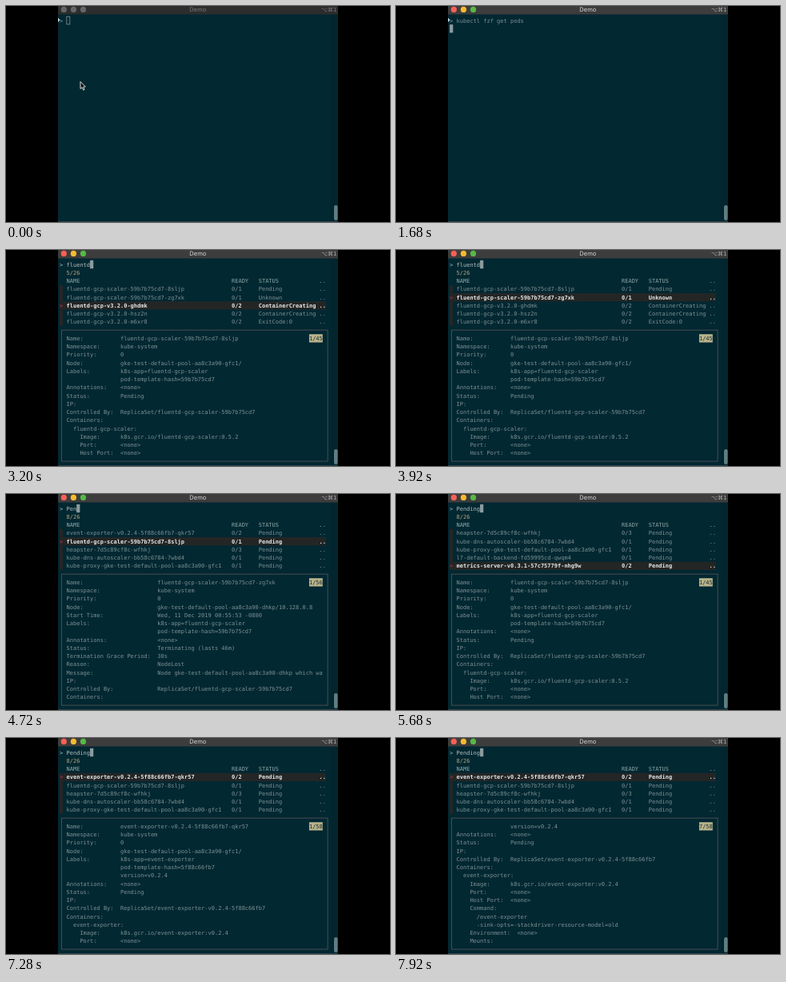
An HTML page with a canvas that plays this animation: 480x270 px, repeating every 8 s.

```html
<!DOCTYPE html>
<html lang="en">
<head>
<meta charset="utf-8">
<title>Demo</title>
<style>
  html, body { margin: 0; width: 100%; height: 100%; overflow: hidden; background: #000; }
  canvas { display: block; width: 480px; height: 270px; }
</style>
</head>
<body>
<canvas id="stage"></canvas>
<script>
const LOOP = 8000, TICK = 80;
const CW = 4.214, RH = 10.26, LEFT = 67.1, TOP = 12.9;
const C = {
  bg: '#022832', text: '#7f9193', bright: '#b4bfbf', head: '#8fa8a8', info: '#b3a57c',
  row: '#242626', selected: '#e6e6e6', pointer: '#c8304f', border: '#5d5558', badge: '#b8b48c'
};

const canvas = document.getElementById('stage');
const g = canvas.getContext('2d');
const dpr = window.devicePixelRatio || 1;
canvas.width = 480 * dpr;
canvas.height = 270 * dpr;

// name, ready, status
const pods = [
  ['event-exporter-v0.2.4-5f88c66fb7-qkr57', '0/2', 'Pending'],
  ['fluentd-gcp-scaler-59b7b75cd7-8sljp', '0/1', 'Pending'],
  ['fluentd-gcp-scaler-59b7b75cd7-zg7xk', '0/1', 'Unknown'],
  ['fluentd-gcp-v3.2.0-ghdmk', '0/2', 'ContainerCreating'],
  ['fluentd-gcp-v3.2.0-hsz2n', '0/2', 'ContainerCreating'],
  ['fluentd-gcp-v3.2.0-m6xr8', '0/2', 'ExitCode:0'],
  ['heapster-7d5c89cf8c-wfhkj', '0/3', 'Pending'],
  ['kube-dns-autoscaler-bb58c6784-7wbd4', '0/1', 'Pending'],
  ['kube-proxy-gke-test-default-pool-aa8c3a90-gfc1', '0/1', 'Pending'],
  ['l7-default-backend-fd59995cd-qwqm4', '0/1', 'Pending'],
  ['metrics-server-v0.3.1-57c75779f-nhg9w', '0/2', 'Pending'],
  ['prometheus-to-sd-x7kqd', '0/1', 'Pending']
];

const describe = (name, app, hash, extra, image) => `Name:           ${name}
Namespace:      kube-system
Priority:       0
Node:           gke-test-default-pool-aa8c3a90-gfc1/
Labels:         k8s-app=${app}
                pod-template-hash=${hash}
${extra}Annotations:    <none>
Status:         Pending
IP:
Controlled By:  ReplicaSet/${name.slice(0, -6)}
Containers:
  ${app}:
    Image:      k8s.gcr.io/${image}
    Port:       <none>
    Host Port:  <none>`;

const previews = {
  event: { total: 58, text: describe(pods[0][0], 'event-exporter', '5f88c66fb7',
    '                version=v0.2.4\n', 'event-exporter:v0.2.4') + `
    Command:
      /event-exporter
      -sink-opts=-stackdriver-resource-model=old
    Environment:  <none>
    Mounts:` },
  scaler: { total: 45, text: describe(pods[1][0], 'fluentd-gcp-scaler', '59b7b75cd7',
    '', 'fluentd-gcp-scaler:0.5.2') },
  lost: { total: 56, text: `Name:                      fluentd-gcp-scaler-59b7b75cd7-zg7xk
Namespace:                 kube-system
Priority:                  0
Node:                      gke-test-default-pool-aa8c3a90-dhkp/10.128.0.8
Start Time:                Wed, 11 Dec 2019 00:55:53 -0800
Labels:                    k8s-app=fluentd-gcp-scaler
                           pod-template-hash=59b7b75cd7
Annotations:               <none>
Status:                    Terminating (lasts 46m)
Termination Grace Period:  30s
Reason:                    NodeLost
Message:                   Node gke-test-default-pool-aa8c3a90-dhkp which wa
IP:
Controlled By:             ReplicaSet/fluentd-gcp-scaler-59b7b75cd7
Containers:` }
};

// Timelines: [start, value]
const cursorAt = [[0, 0], [3120, 1], [3200, 2], [3280, 3], [3440, 4], [3600, 3], [3760, 2], [3920, 1],
  [5280, 2], [5360, 3], [5440, 4], [5600, 5], [5680, 6],
  [5920, 5], [6080, 4], [6240, 3], [6400, 2], [6560, 1], [6720, 0]];
const previewAt = [[0, 'event'], [3040, 'scaler'], [4080, 'lost'], [5120, 'scaler'], [7040, 'event']];
const at = (line, t) => line.filter(e => e[0] <= t).pop()[1];

// Part of s typed from start on, n characters per tick
const typed = (s, t, start, n = 1) =>
  s.slice(0, Math.max(0, Math.ceil(((t - start) / TICK + 1) * n)));

function query(t) {
  if (t < 4160) return typed('fluentd', t, 2400);
  if (t < 4560) return 'fluentd'.slice(0, Math.max(0, 5 - 2 * (t - 4160) / TICK));
  return typed('Pending', t, 4560);
}

const colX = col => LEFT + col * CW;
const rowY = row => TOP + row * RH;

function rect(x, y, w, h, color) {
  g.fillStyle = color;
  g.fillRect(x, y, w, h);
}

function put(s, col, row, color = C.text, bold = false) {
  g.font = (bold ? 'bold ' : '') + '7px "DejaVu Sans Mono", monospace';
  g.textAlign = 'left';
  g.fillStyle = color;
  [...s].forEach((c, i) => c !== ' ' && g.fillText(c, colX(col + i), rowY(row) + 7.6));
}

const block = (col, row) => rect(colX(col), rowY(row), CW, RH, '#8b9c9e');

function poly(points, color) {
  g.beginPath();
  points.forEach(([x, y]) => g.lineTo(x, y));
  g.closePath();
  g.fillStyle = color;
  g.fill();
}

function windowFrame(active) {
  rect(0, 0, 480, 270, '#000');
  rect(65, 0, 350, 270, C.bg);
  rect(406, 10.5, 9, 259.5, '#03252e');
  rect(65, 269, 350, 1, '#2c4148');
  rect(65, 0, 350, 10.5, active ? '#3d3d3d' : '#2d2d2d');
  ['#f95f57', '#f8bb2f', '#56b947'].forEach((color, i) => {
    g.beginPath();
    g.arc(72.3 + i * 12.1, 4.4, 3.6, 0, 7);
    g.fillStyle = active ? color : '#666';
    g.fill();
  });
  g.fillStyle = active ? '#d2d2d2' : '#777';
  g.textAlign = 'center';
  g.font = '7.5px Inter, sans-serif';
  g.fillText('Demo', 239.8, 7.2);
  g.textAlign = 'right';
  g.font = '7px "DejaVu Sans", sans-serif';
  g.fillStyle = active ? '#aaa' : '#777';
  g.fillText('⌥⌘1', 413.5, 7);
  g.beginPath();
  g.roundRect(410, 249, 4.6, 19, 2.2);
  g.fillStyle = '#5f7e84';
  g.fill();
}

function mouse(t) {
  if (t >= 400) return;
  const x = t < 80 ? 93 : 94, y = t < 80 ? 94.5 : 90.5;
  g.save();
  g.translate(x, y);
  poly([[0, 0], [0, 9], [2, 7.2], [3.6, 10.6], [5, 10], [3.6, 6.6], [6.3, 6.4]], '#111');
  g.strokeStyle = '#eee';
  g.lineWidth = 0.9;
  g.stroke();
  g.restore();
}

function shell(t) {
  const line = typed('kubectl fzf ', t, 560, 2.4) + typed('get pods', t, 1040, 1.6);
  poly([[65, 14.8], [67.6, 17.5], [65, 20.2]], '#c4d4d8');
  put('>', 0, 0, '#69a5b0');
  put(line, 2, 0);
  if (t >= 1520) block(0, 1);
  else if (t >= 80) block(2 + line.length, 0);
  else {
    g.strokeStyle = '#819294';
    g.lineWidth = 0.8;
    g.strokeRect(colX(2) + 0.3, rowY(0) + 0.3, CW - 0.2, RH - 0.6);
  }
}

function podList(t) {
  const q = query(t), index = at(cursorAt, t);
  const found = pods.filter(p => p.join(' ').includes(q));
  const offset = t < 5920 ? Math.max(0, index - 4) : Math.min(2, index);
  put('>', 0, 0, '#9fb9c4');
  put(q, 2, 0, C.bright);
  block(2 + q.length, 0);
  put((q ? found.length : 26) + '/26', 2, 1, C.info);
  const columns = (cells, row, color, bold) =>
    [2, 51, 59, 77].forEach((col, i) => put(cells[i], col, row, color, bold));
  columns(['NAME', 'READY', 'STATUS', '..'], 2, C.head);
  found.slice(offset, offset + 5).forEach((pod, i) => {
    const row = i + 3, on = i + offset === index;
    rect(colX(0), rowY(row), on ? 79 * CW : CW, RH, C.row);
    if (on) put('>', 0, row, C.pointer);
    columns([...pod, '..'], row, on ? C.selected : C.text, on);
  });
}

function preview(t) {
  const { total, text } = previews[at(previewAt, t)];
  const scroll = Math.max(0, (t - 7520) / TICK + 1);
  g.strokeStyle = C.border;
  g.lineWidth = 0.8;
  g.strokeRect(69.4, 100.1, 332.7, 164);
  text.split('\n').slice(scroll, scroll + 15).forEach((s, i) => put(s, 2, 9 + i));
  const badge = `${scroll + 1}/${total}`;
  rect(colX(74), rowY(9), 4 * CW, RH, C.badge);
  put(badge, 74, 9, '#1d2a2c');
}

function draw(now) {
  const t = Math.floor(now % LOOP / TICK) * TICK;
  g.setTransform(dpr, 0, 0, dpr, 0, 0);
  g.textRendering = 'geometricPrecision';
  windowFrame(t >= 80);
  if (t < 2000) shell(t);
  else {
    podList(t);
    preview(t);
  }
  mouse(t);
}

function loop() {
  draw(performance.now());
  requestAnimationFrame(loop);
}
loop();
</script>
</body>
</html>
```
